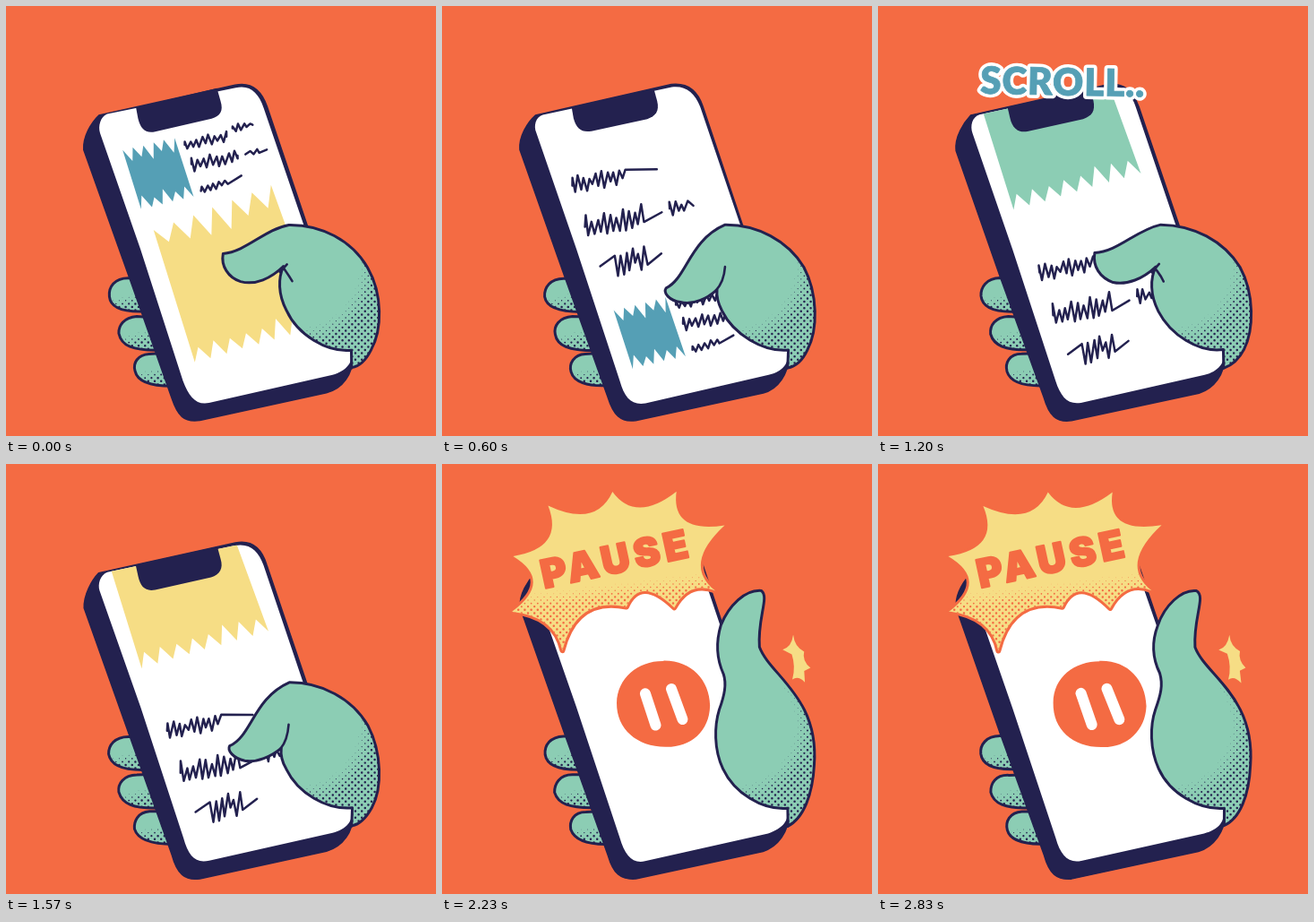
Animation, 480 px wide and 480 px high, one loop 2.91 s. Source, as an HTML page with a canvas:

```html
<!DOCTYPE html>
<html lang="en">
<head>
<meta charset="utf-8">
<title>Scroll and pause</title>
<style>
html, body { margin: 0; width: 100%; height: 100%; overflow: hidden; background: #f46b43; }
canvas { display: block; width: 100vw; height: 100vh; }
</style>
</head>
<body>
<canvas id="stage" width="480" height="480"></canvas>
<script>
const ctx = document.getElementById('stage').getContext('2d');
const ORANGE = '#f46b43', NAVY = '#23214f', GREEN = '#8ccdb4';
const YELLOW = '#f6dd85', TEAL = '#559fb5', WHITE = '#fff';

const LOOP = 2910, CYCLE = 600, PAUSE_AT = 1630, HOLD_AT = 1770;
const BEATS = [0, 100, 170, 230, 370, 400, 470, 530]; // drawings within a scroll cycle
const PAUSE_STEP = 21;

const BODY = 'M104 122 C96 130 86 146 87 161 L137 302 L185 437 C191 457 199 465 216 463 L358 432 C376 427 387 410 387 392 L336 246 L291 112 C285 94 274 85 256 88 Z';
const FACE = 'M113 121 C105 124 102 134 105 142 L150 272 L198 418 C204 437 212 446 227 443 L364 412 C380 408 389 398 385 384 L333 246 L288 113 C282 97 272 88 256 91 Z';
const NOTCH = 'M145 113 L147 125 C150 137 156 142 167 140 L229 126 C239 123 243 117 240 106 L236 92 Z';
const FINGERS = [
  'M150 304 L136 304 C121 304 114 314 115 324 C117 337 131 342 156 341',
  'M160 347 L146 347 C131 347 125 357 126 366 C129 379 141 385 172 384',
  'M176 388 L160 388 C147 389 142 399 144 408 C147 419 161 425 188 424'
];
const PALM = 'M386 404 L386 384 C358 387 326 367 313 340 ';
const BACK = ' C352 244 386 262 404 292 C420 322 420 362 408 384 C402 396 394 402 386 404 Z';
const THUMB_HIGH = PALM + 'C304 322 304 304 310 291 C296 304 278 312 262 308 C248 303 240 290 242 276 C268 274 288 250 316 244' + BACK;
const THUMB_LOW = PALM + 'C308 332 306 324 307 317 C296 326 280 334 266 331 C254 329 246 320 250 315 C274 304 276 262 316 244' + BACK;
const THUMB_UP = PALM + 'C303 318 304 292 310 274 C316 258 318 246 314 234 C306 216 306 196 312 180 C320 158 338 140 356 142 C366 148 352 172 354 204 C366 236 422 260 416 336 C414 368 404 396 386 404 Z';
const CREASE_HIGH = 'M314 288 L306 297 M310 293 C313 297 316 301 319 307';
const CREASE_LOW = 'M316 291 C315 302 312 311 306 318';
const DISC = 'M247 220 C278 219 299 241 299 270 C298 299 276 317 249 316 C217 316 195 296 195 267 C196 238 219 220 247 220 Z';
const SPARK = 'M392 191 Q394 203 404 209 Q402 219 411 227 L404 231 L405 244 Q398 236 391 241 Q395 226 390 212 L380 207 Q390 204 392 191 Z';

const SPIKES = [[79, 165], [79, 103], [118, 47], [190, 31], [262, 31], [316, 68], [305, 141]];
const FRILL = 'Q276 130 259 161 Q222 124 206 160 Q150 148 134 208 Q126 170 79 165 Z';

// Wobble changes with every drawing; noise stays the same
let seed = 1;
function wobble(amount) {
  seed = (seed * 16807) % 2147483647;
  return (seed / 2147483647 - 0.5) * amount;
}

function noise(n) {
  const v = Math.sin(n * 12.9898) * 43758.5453;
  return v - Math.floor(v);
}

const shape = d => new Path2D(d.replace(/[\d.]+/g, n => (+n + wobble(1.2)).toFixed(2)));
const lerp = (a, b, t) => a + (b - a) * t;
const polyline = points => 'M' + points.map(([x, y]) => x.toFixed(1) + ' ' + y.toFixed(1)).join(' L');

function mix(a, b, t) {
  const ends = b.match(/[\d.]+/g);
  let i = 0;
  return a.replace(/[\d.]+/g, n => lerp(+n, +ends[i++], t));
}

function paint(path, fill, line, width) {
  if (fill) {
    ctx.fillStyle = fill;
    ctx.fill(path);
  }
  if (line) {
    ctx.strokeStyle = line;
    ctx.lineWidth = width;
    ctx.stroke(path);
  }
}

function halftone(path, color, x0, y0, x1, y1, size) {
  const gap = 3.6;
  ctx.save();
  ctx.clip(path);
  ctx.fillStyle = color;
  ctx.beginPath();
  for (let row = 0, y = y0; y < y1; row++, y += gap) {
    for (let x = x0 + (row % 2) * gap; x < x1; x += gap * 2) {
      const r = Math.min(1, size(x, y)) * 1.25;
      if (r > 0.2) {
        ctx.moveTo(x + r, y);
        ctx.arc(x, y, r, 0, 7);
      }
    }
  }
  ctx.fill();
  ctx.restore();
}

// Scrawled writing: a jagged run with optional flat ends
function scrawl(x, y, length, slope, amp, lead = 0, tail = 0) {
  const points = [[0, 0]];
  const count = Math.round(length / 3.4);
  for (let i = 0; i <= count; i++) {
    const swing = (i % 2 ? 1 : -1) * amp * (0.25 + 0.75 * noise(i + x));
    points.push([lead + length * i / count, swing]);
  }
  points.push([lead + length + tail, 0]);
  paint(shape(polyline(points.map(([dx, dy]) => [x + dx, y + dx * slope + dy]))), null, NAVY, 2.5);
}

// Tips along an edge with notches cut between them
function teeth(x0, y0, x1, y1, n, depth) {
  const points = [];
  for (let i = 0; i <= n * 2; i++) {
    const t = i / (n * 2);
    const cut = i % 2 ? depth * (0.7 + 0.6 * noise(i + n)) : 0;
    points.push([lerp(x0, x1, t) + cut * 0.35, lerp(y0, y1, t) + cut]);
  }
  return points;
}

function block(color, top, bottom) {
  paint(shape(polyline([...teeth(...top), ...teeth(...bottom)]) + ' Z'), color);
}

function at(x, y, draw) {
  ctx.save();
  ctx.translate(x, y);
  draw();
  ctx.restore();
}

function smallPost(color) {
  block(color, [130, 161, 188, 147, 5, 13], [210, 213, 151, 227, 5, -12]);
  scrawl(199, 155, 47, -0.2, 6);
  scrawl(253, 136, 19, -0.16, 4, 0, 3);
  scrawl(207, 177, 52, -0.2, 8);
  scrawl(267, 165, 10, -0.2, 4, 6, 8);
  scrawl(218, 206, 30, -0.36, 5, 0, 15);
}

function bigPost(color) {
  block(color, [165, 250, 296, 200, 6, 22], [353, 357, 211, 398, 8, -16]);
}

function textPost() {
  scrawl(145, 200, 60, -0.19, 10, 0, 35);
  scrawl(160, 247, 66, -0.19, 14, 0, 19);
  scrawl(254, 226, 20, -0.12, 8, 0, 7);
  scrawl(177, 291, 36, -0.22, 15, 16, 16);
}

function feed(k) {
  const small = Math.floor(k / 3) % 2 ? ORANGE : TEAL;
  const big = Math.floor((k + 1) / 3) % 2 ? GREEN : YELLOW;
  if (k % 3 === 0) {
    bigPost(big);
    smallPost(small);
  } else if (k % 3 === 1) {
    textPost();
    at(62, 178, () => smallPost(small));
  } else {
    at(-60, -170, () => bigPost(big));
    at(35, 98, textPost);
  }
}

function pauseSign() {
  paint(shape(DISC), ORANGE);
  paint(shape('M227 256 L239 291 M256 251 L269 285'), null, WHITE, 12);
}

function phone(content) {
  paint(shape(BODY), NAVY, NAVY, 1.5);
  const face = shape(FACE);
  paint(face, WHITE);
  ctx.save();
  ctx.clip(face);
  content();
  ctx.restore();
  paint(shape(NOTCH), NAVY);
}

function fingers() {
  FINGERS.forEach((d, i) => {
    const path = shape(d);
    const low = 322 + i * 41;
    paint(path, GREEN);
    halftone(path, NAVY, 112, 300, 200, 430, (x, y) => (y - low + (x - 130 - i * 14) * 0.25) / 14);
    paint(path, null, NAVY, 3);
  });
}

function hand(d, crease) {
  const path = shape(d);
  paint(path, GREEN);
  halftone(path, NAVY, 300, 240, 420, 408, (x, y) => (Math.hypot(x - 325, y - 290) - 66) / 22);
  paint(path, null, NAVY, 3);
  if (crease) paint(shape(crease), null, NAVY, 2.6);
}

function lettering(text, x, y, angle, font, spacing, color, fat, edge) {
  ctx.save();
  ctx.translate(x + wobble(1), y + wobble(1));
  ctx.rotate(angle);
  ctx.font = font;
  ctx.letterSpacing = spacing;
  if (edge) {
    ctx.strokeStyle = edge;
    ctx.lineWidth = 8;
    ctx.strokeText(text, 0, 0);
  }
  ctx.strokeStyle = ctx.fillStyle = color;
  ctx.lineWidth = fat;
  ctx.strokeText(text, 0, 0);
  ctx.fillText(text, 0, 0);
  ctx.restore();
}

// Edges between spikes sag towards the middle
function burstPath() {
  const sag = 0.38;
  let d = 'M' + SPIKES[0].join(' ');
  for (let i = 1; i < SPIKES.length; i++) {
    const [ax, ay] = SPIKES[i - 1], [bx, by] = SPIKES[i];
    d += ` Q${lerp((ax + bx) / 2, 200, sag)} ${lerp((ay + by) / 2, 125, sag)} ${bx} ${by}`;
  }
  return d + FRILL;
}

function burst(scale) {
  ctx.save();
  ctx.translate(195, 120);
  ctx.scale(scale, scale);
  ctx.translate(-195, -120);
  const path = shape(burstPath());
  paint(path, null, ORANGE, 6);
  paint(path, YELLOW);
  halftone(path, ORANGE, 78, 98, 310, 210, (x, y) => (y - 143 + (x - 85) * 0.12) / 20);
  lettering('PAUSE', 114, 139, -0.213, '900 44px Inter, sans-serif', '5px', ORANGE, 2);
  ctx.restore();
}

function drawScroll(step) {
  // One drawing in eight repeats the pose
  const k = step - Math.floor((step + 4) / 8);
  phone(() => feed(k));
  if (k % 2) hand(THUMB_LOW, CREASE_LOW);
  else hand(THUMB_HIGH, CREASE_HIGH);
  if (step >= 13 && step < 20) {
    const dots = '.'.repeat(Math.max(0, Math.min(3, step - 14)));
    lettering('SCROLL' + dots, 114, 98, 0.02, '900 42px Lato, sans-serif', '1px', TEAL, 0.8, WHITE);
  }
}

function drawPause(since) {
  phone(pauseSign);
  hand(since ? THUMB_UP : mix(THUMB_LOW, THUMB_UP, 0.5));
  burst(1 - 0.45 * Math.max(0, 1 - since / 2) ** 2);
  if (since > 1) paint(shape(SPARK), YELLOW);
}

function draw(step) {
  seed = 977 + step * 7919;
  for (let i = 0; i < 4; i++) wobble(1);
  ctx.fillStyle = ORANGE;
  ctx.fillRect(0, 0, 480, 480);
  ctx.lineJoin = ctx.lineCap = 'round';
  fingers();
  if (step < PAUSE_STEP) drawScroll(step);
  else drawPause(step - PAUSE_STEP);
}

function stepAt(t) {
  if (t >= HOLD_AT) return PAUSE_STEP + 2 + Math.floor((t - HOLD_AT) / 150);
  if (t >= PAUSE_AT) return PAUSE_STEP + Math.floor((t - PAUSE_AT) / 70);
  const beat = BEATS.filter(b => b <= t % CYCLE).length - 1;
  return Math.floor(t / CYCLE) * BEATS.length + beat;
}

let shown = -1;
function tick() {
  const step = stepAt(performance.now() % LOOP);
  if (step !== shown) draw(shown = step);
  requestAnimationFrame(tick);
}
tick();
</script>
</body>
</html>
```
